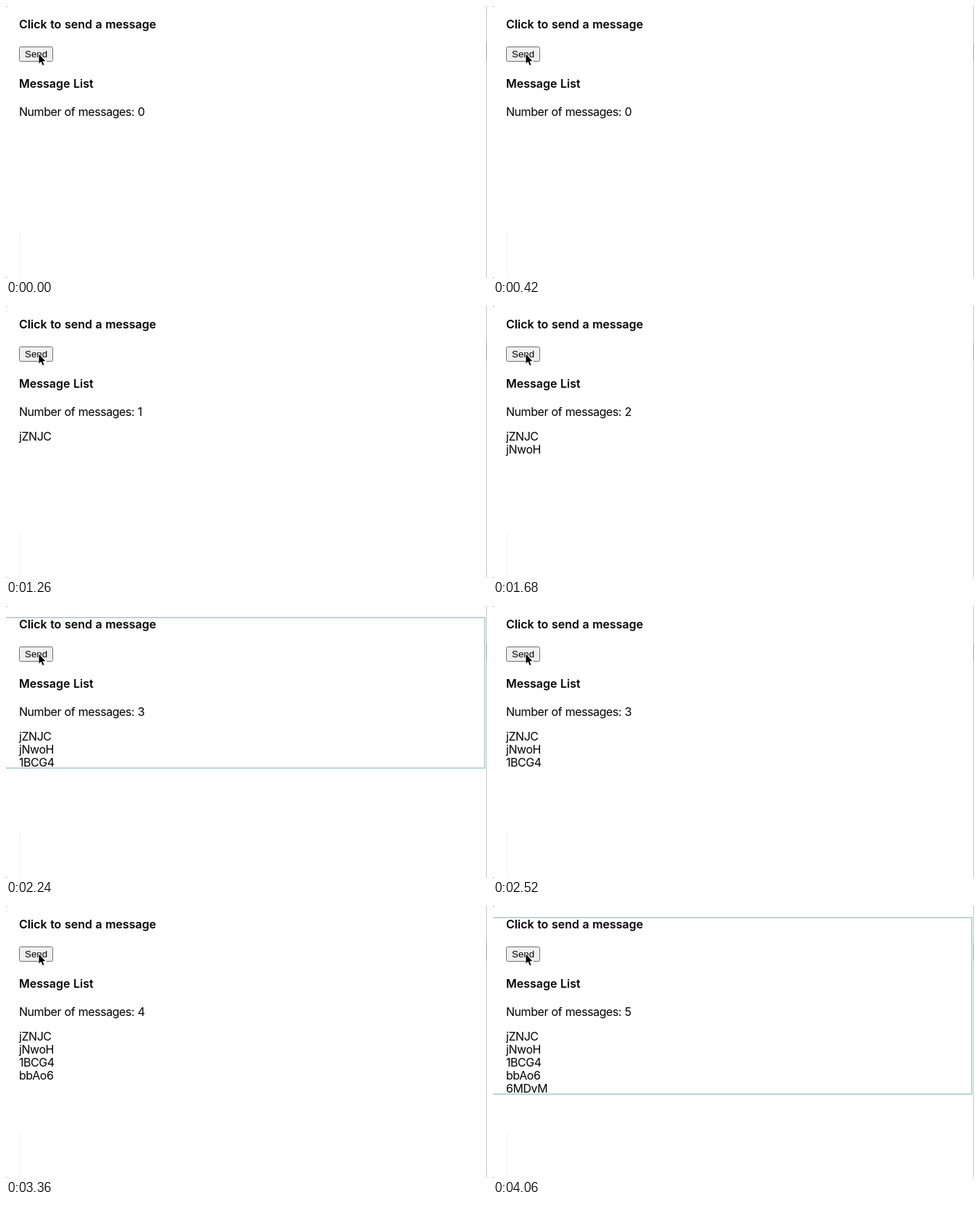
Write an HTML page that moves like this. It is 664 px wide and 376 px high and loops after 4.13 s.

```html
<!DOCTYPE html>
<html lang="en">
<head>
<meta charset="utf-8">
<title>Message list</title>
<style>
  html, body { margin: 0; width: 100%; height: 100%; overflow: hidden; background: #fff; }
  svg { display: block; }
  text { font: 16px Inter, sans-serif; letter-spacing: -0.028em; word-spacing: 0.5px; fill: #000; }
  .heading { font-weight: 600; letter-spacing: 0; }
  .label { font: 13.333px "Liberation Sans", Arial, sans-serif; letter-spacing: 0; }
</style>
</head>
<body>
<svg width="664" height="376" viewBox="0 0 664 376">
  <rect width="664" height="376" fill="#8a8a8a"/>
  <rect width="664" height="376" rx="2.5" fill="#fff"/>
  <path d="M663.5 2V374" stroke="#c4c4c4"/>
  <path d="M663.5 51V75" stroke="#a0a0a0"/>
  <path d="M19.5 312V376" stroke="#f3f3f3"/>

  <text class="heading" x="18" y="31">Click to send a message</text>
  <rect x="18.5" y="56.5" width="46" height="20" rx="2" fill="#efefef" stroke="#707070"/>
  <text class="label" x="26" y="71">Send</text>
  <text class="heading" x="18" y="113">Message List</text>
  <text id="count" x="18" y="152"></text>
  <g id="list"></g>
  <rect id="highlight" x="-5" y="16" width="666" fill="none" stroke="#b5d8d5" stroke-width="2"/>
  <path d="M45.5 66.5V79.5L48.4 76.8L50.8 82L52.6 81.2L50.4 76.2H54.4Z"
        fill="#000" stroke="#fff" stroke-width="1.6" paint-order="stroke"/>
</svg>
<script>
  const LOOP = 4130;
  const LINE = 18;
  const FLASH = 280;
  const messages = [
    { at: 490, text: "jZNJC", flash: 210 },
    { at: 1330, text: "jNwoH" },
    { at: 2100, text: "1BCG4" },
    { at: 2940, text: "bbAo6" },
    { at: 3710, text: "6MDvM", flash: LOOP - 3710 }
  ];

  const count = document.getElementById("count");
  const list = document.getElementById("list");
  const highlight = document.getElementById("highlight");

  const rows = messages.map(({ text }, i) => {
    const row = document.createElementNS("http://www.w3.org/2000/svg", "text");
    row.setAttribute("x", 18);
    row.setAttribute("y", 186 + i * LINE);
    row.textContent = text;
    return list.appendChild(row);
  });

  function render(now) {
    const time = now % LOOP;
    const sent = messages.filter(m => time >= m.at);
    const latest = sent[sent.length - 1];
    const flashing = latest && time - latest.at < (latest.flash || FLASH);

    count.textContent = "Number of messages: " + sent.length;
    rows.forEach((row, i) => row.setAttribute("visibility", i < sent.length ? "visible" : "hidden"));
    highlight.setAttribute("visibility", flashing ? "visible" : "hidden");
    highlight.setAttribute("height", 154 + sent.length * LINE);
    requestAnimationFrame(render);
  }
  render(0);
</script>
</body>
</html>
```
